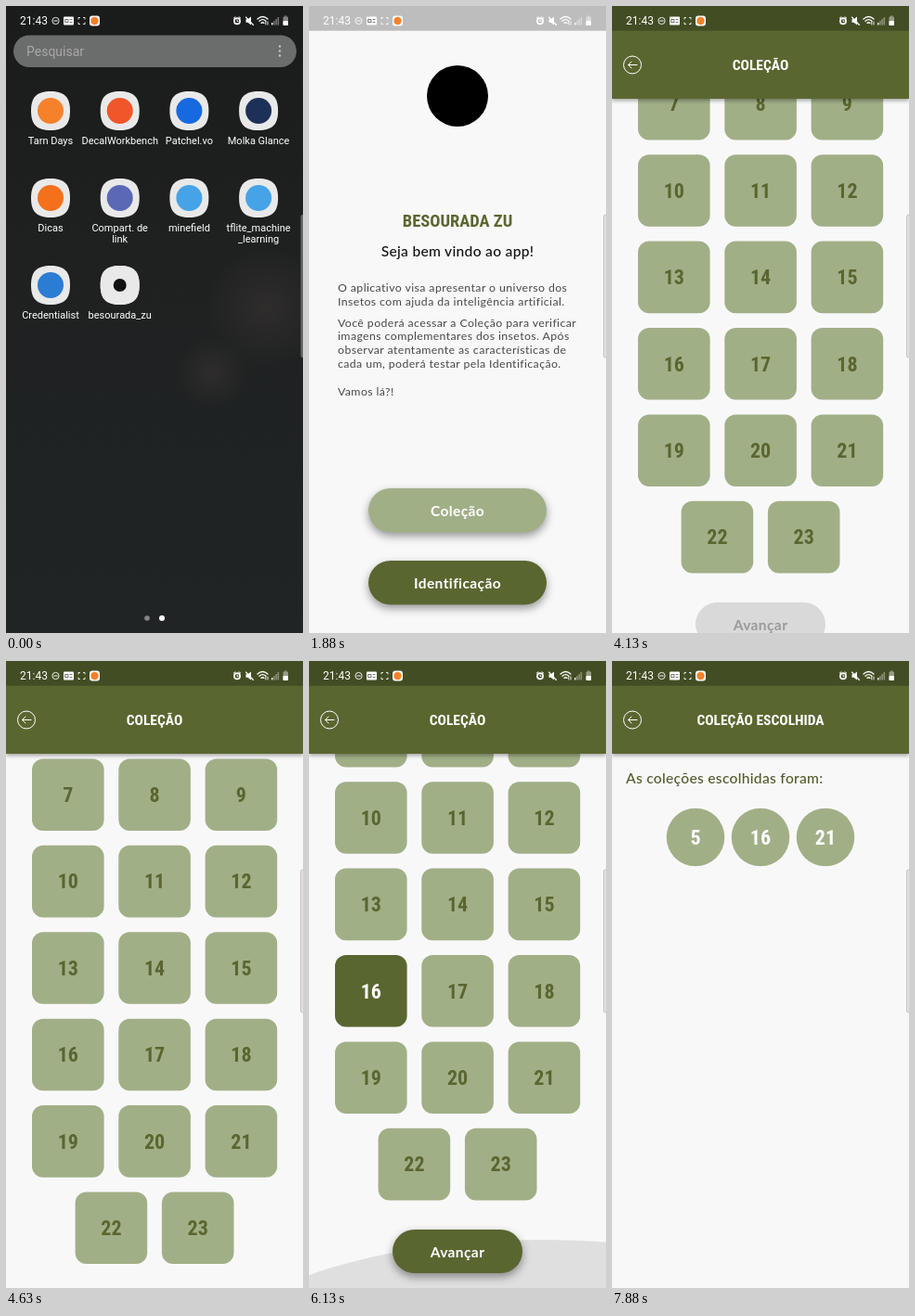
These frames come from a looping animation (320 by 676 pixels, 8000 ms). An HTML page:

```html
<!DOCTYPE html>
<html lang="pt">
<head>
<meta charset="utf-8">
<title>Coleção de insetos</title>
<style>
  html, body { margin: 0; width: 100%; height: 100%; overflow: hidden; background: #000; }
  svg { display: block; width: 100%; height: 100%; }
  text { font-family: Roboto, sans-serif; }
  .mid { text-anchor: middle; }
  .label { font-size: 11px; fill: #fff; text-anchor: middle; }
  .body, .lead, .button { font-family: Lato, sans-serif; }
  .body { font-size: 12.3px; letter-spacing: .41px; fill: #484848; }
  .lead { font-size: 15.6px; letter-spacing: .3px; font-weight: 500; }
  .button { font-size: 15.5px; letter-spacing: .4px; font-weight: 700; text-anchor: middle; }
  .narrow { font-family: "Roboto Condensed", Roboto, sans-serif;
            font-stretch: condensed; font-weight: 700; text-anchor: middle; }
  .raised { filter: drop-shadow(0 4px 5px rgba(0,0,0,.4)); }
  .bar { filter: drop-shadow(0 2px 2px rgba(0,0,0,.35)); }
</style>
</head>
<body>
<svg id="stage" viewBox="0 0 320 676">
  <defs>
    <linearGradient id="wall" x2="0" y2="1">
      <stop offset="0" stop-color="#1a1b1b"/>
      <stop offset=".4" stop-color="#1f2121"/>
      <stop offset="1" stop-color="#202425"/>
    </linearGradient>
    <radialGradient id="haze">
      <stop offset="0" stop-color="#3a3433" stop-opacity=".6"/>
      <stop offset="1" stop-color="#3a3433" stop-opacity="0"/>
    </radialGradient>
  </defs>
</svg>
<script>
const DURATION = 8000, STEP = 125;
const DARK = '#5a6630', LIGHT = '#a1af87', PAPER = '#f9f8f9';
const SCROLL = [[3625, 0], [3875, 100], [4125, 236], [4250, 266], [4500, 266], [4875, 60], [5000, 0], [5500, 0], [6000, 266]];
const PICKED = { 5: 5125, 16: 5500, 21: 6500 };

const stage = document.getElementById('stage');

function set(node, attrs) {
  for (const key in attrs) node.setAttribute(key, attrs[key]);
  return node;
}
function add(parent, tag, attrs = {}, content = '') {
  const node = set(document.createElementNS('http://www.w3.org/2000/svg', tag), attrs);
  node.textContent = content;
  return parent.appendChild(node);
}
const group = (parent, attrs) => add(parent, 'g', attrs);
const rect = (parent, x, y, width, height, fill, rx = 0, more = {}) =>
  add(parent, 'rect', { x, y, width, height, fill, rx, ...more });
const circle = (parent, cx, cy, r, fill, more = {}) => add(parent, 'circle', { cx, cy, r, fill, ...more });
const line = (parent, d, stroke = '#fff', width = 1) =>
  add(parent, 'path', { d, stroke, 'stroke-width': width, fill: 'none', 'stroke-linecap': 'round' });
const label = (parent, x, y, content, cls, more = {}) => add(parent, 'text', { x, y, class: cls, ...more }, content);

const clamp = v => Math.max(0, Math.min(1, v));
const mix = (a, b, p) => a + (b - a) * p;
const progress = (t, start, length) => 1 - (1 - clamp((t - start) / length)) ** 3;
function along(points, t) {
  const i = points.findIndex(p => p[0] > t);
  if (i === 0) return points[0][1];
  if (i < 0) return points[points.length - 1][1];
  const [a, b] = [points[i - 1], points[i]];
  return mix(a[1], b[1], (t - a[0]) / (b[0] - a[0]));
}

// Rounded launcher tile, centred on 0,0 and 42 wide
function appIcon(parent, color, r) {
  const g = group(parent);
  add(g, 'path', { d: 'M0-21C14.8-21 21-14.8 21 0S14.8 21 0 21-21 14.8-21 0-14.8-21 0-21Z', fill: '#e9e9e9' });
  circle(g, 0, 0, r, color);
  return g;
}

function buildLauncher() {
  const g = group(stage);
  rect(g, 0, 0, 320, 676, 'url(#wall)');
  circle(g, 280, 325, 65, 'url(#haze)');
  circle(g, 222, 395, 38, 'url(#haze)');
  rect(g, 8, 31.5, 305, 34.5, '#6b6c6c', 17.25);
  label(g, 22, 53.5, 'Pesquisar', '', { 'font-size': 14, fill: '#a8a8a8' });
  [43.5, 48.5, 53.5].forEach(y => circle(g, 295, y, 1.2, '#c4c4c4'));
  const apps = [
    ['Tarn Days', '#f5822b'], ['DecalWorkbench', '#f0562a'], ['Patchel.vo', '#1769e0'], ['Molka Glance', '#1d3158'],
    ['Dicas', '#f5701c'], ['Compart. de|link', '#5b68b5'], ['minefield', '#47a3e8'], ['tflite_machine|_learning', '#47a3e8'],
    ['Credentialist', '#2b7cd3'], ['besourada_zu', '#111']
  ];
  apps.forEach(([name, color], i) => {
    const x = 48 + 74.7 * (i % 4), y = 113 + 94 * Math.floor(i / 4);
    set(appIcon(g, color, i === 9 ? 7 : 14), { transform: `translate(${x} ${y})` });
    name.split('|').forEach((part, row) => label(g, x, y + 36 + row * 12, part, 'label'));
  });
  circle(g, 152, 660, 2.8, '#858585');
  circle(g, 168, 660, 3, '#fff');
  return g;
}

function buildWelcome() {
  const g = group(stage);
  rect(g, 0, 0, 320, 676, PAPER);
  rect(g, 0, 0, 320, 26.7, '#bdbdbd');
  circle(g, 160, 97, 33, '#000');
  label(g, 160, 238, 'BESOURADA ZU', 'narrow', { 'font-size': 18.5, fill: DARK });
  label(g, 160, 269.5, 'Seja bem vindo ao app!', 'lead mid', { fill: '#111' });
  [[308, 'O aplicativo visa apresentar o universo dos'],
   [323, 'Insetos com ajuda da inteligência artificial.'],
   [345.5, 'Você poderá acessar a Coleção para verificar'],
   [360, 'imagens complementares dos insetos. Após'],
   [375, 'observar atentamente as características de'],
   [390, 'cada um, poderá testar pela Identificação.'],
   [420, 'Vamos lá?!']].forEach(([y, words]) => label(g, 31, y, words, 'body'));
  [[520, LIGHT, 'Coleção'], [598, DARK, 'Identificação']].forEach(([y, color, name]) => {
    rect(g, 64, y, 192, 47.5, color, 23.75, { class: 'raised' });
    label(g, 160, y + 30, name, 'button', { fill: '#fff' });
  });
  return g;
}

function addAppBar(page, title) {
  rect(page, 0, 0, 320, 100, DARK, 0, { class: 'bar' });
  rect(page, 0, 0, 320, 26.7, '#424d24');
  circle(page, 22, 63.5, 9.5, 'none', { stroke: '#fff' });
  line(page, 'M27 63.5H17.5M21 60L17.5 63.5L21 67');
  label(page, 160, 69, title, 'narrow', { 'font-size': 15.5, fill: '#fff' });
}

function buildCollection() {
  const page = group(stage);
  rect(page, 0, 0, 320, 676, PAPER);
  const glow = add(page, 'ellipse', { cx: 250, cy: 760, rx: 360, ry: 136, fill: '#000' });
  const list = group(page);
  const tiles = Array.from({ length: 23 }, (_, i) => {
    const row = Math.floor(i / 3);
    const x = (row === 7 ? 74.6 : 28) + 93.3 * (i % 3), y = 116 + 93.4 * row;
    return {
      box: rect(list, x, y, 77.6, 77.6, LIGHT, 12),
      digits: label(list, x + 38.8, y + 46.5, i + 1, 'narrow', { 'font-size': 22 })
    };
  });
  const next = {
    box: rect(list, 90, 879, 140, 47, '#d9d9d9', 23.5),
    name: label(list, 160, 908.5, 'Avançar', 'button')
  };
  addAppBar(page, 'COLEÇÃO');
  return { page, glow, list, tiles, next };
}

function buildChosen() {
  const page = group(stage);
  rect(page, 0, 0, 320, 676, PAPER);
  addAppBar(page, 'COLEÇÃO ESCOLHIDA');
  label(page, 15, 132, 'As coleções escolhidas foram:', 'lead', { fill: '#505b29' });
  Object.keys(PICKED).forEach((n, i) => {
    circle(page, 90 + 70 * i, 190, 31.3, LIGHT);
    label(page, 90 + 70 * i, 197.5, n, 'narrow', { 'font-size': 22, fill: '#fff' });
  });
  return page;
}

function buildStatus() {
  const g = group(stage);
  label(g, 15, 20, '21:43', '', { 'font-size': 12, fill: '#fff' });
  circle(g, 53.5, 16, 3.6, 'none', { stroke: '#fff', 'stroke-width': .9 });
  line(g, 'M51.8 16H55.2');
  rect(g, 62, 11.5, 11, 9, '#fff', 1);
  line(g, 'M64 14.5H67V17.5H64ZM69 14.5H71M69 17.5H71', '#555', .8);
  line(g, 'M78 14V12.5H79.5M83.5 12.5H85V14M85 18V19.5H83.5M79.5 19.5H78V18', '#fff', .9);
  rect(g, 90, 10.5, 11, 11, '#fff', 3);
  circle(g, 95.5, 16, 4.2, '#f5822b');
  circle(g, 249, 16.3, 3.1, 'none', { stroke: '#fff', 'stroke-width': 1.7 });
  line(g, 'M245.3 13L247 11.8M252.7 13L251 11.8M249 15V16.5H250');
  add(g, 'path', { d: 'M258.5 14.2H260.5L264 11.5V20.5L260.5 17.8H258.5Z', fill: '#fff' });
  line(g, 'M258.5 12L266.5 20.5', '#fff', 1.1);
  line(g, 'M271 14Q276.5 9 282 14M273 16.3Q276.5 13 280 16.3M275 18.4Q276.5 17 278 18.4', '#fff', 1.3);
  line(g, 'M279.8 20V17M282 17V20', '#fff', .9);
  [0, 1, 2, 3].forEach(i => rect(g, 286 + 2.2 * i, 18 - 2 * i, 1.5, 2.5 + 2 * i, '#fff', 0, { opacity: i ? .4 : .9 }));
  rect(g, 298.5, 11.5, 5.5, 9.5, '#fff', 1, { opacity: .45 });
  rect(g, 300, 10.5, 2.5, 1, '#fff', 0, { opacity: .45 });
  rect(g, 298.5, 16, 5.5, 5, '#fff', 1);
}

const launcher = buildLauncher();
const splash = rect(stage, 0, 0, 320, 676, '#000');
const splashIcon = appIcon(stage, '#111', 7);
const welcome = buildWelcome();
const collection = buildCollection();
const chosen = buildChosen();
const handle = rect(stage, 317.5, 225, 8, 154, '#666', 2);
buildStatus();

function slideIn(page, p) {
  set(page, { opacity: p, transform: `translate(0 ${60 * (1 - p)})`, visibility: p > 0 ? 'visible' : 'hidden' });
}

function renderLaunch(t) {
  const p = progress(t, 60, 540);
  set(launcher, { opacity: 1 - p });
  set(splash, {
    x: mix(102, 0, p), y: mix(280, 0, p), width: mix(42, 320, p), height: mix(42, 676, p),
    rx: mix(18, 0, p), opacity: clamp(p * 4)
  });
  set(splashIcon, { transform: `translate(${mix(122.7, 160.5, p)} ${mix(301, 337, p)}) scale(${mix(1, 1.55, p)})` });
  set(welcome, { opacity: clamp((t - 1250) / 250) });
}

function renderCollection(t) {
  const { page, glow, list, tiles, next } = collection;
  slideIn(page, progress(t, 3200, 300));
  set(list, { transform: `translate(0 ${-along(SCROLL, t)})` });
  tiles.forEach(({ box, digits }, i) => {
    const on = t >= PICKED[i + 1];
    set(box, { fill: on ? DARK : LIGHT });
    set(digits, { fill: on ? '#fff' : DARK });
  });
  const enabled = t >= PICKED[5];
  set(next.box, { fill: enabled ? DARK : '#d9d9d9', class: enabled ? 'raised' : '' });
  set(next.name, { fill: enabled ? '#fff' : '#999' });
  const strength = along([[5900, 0], [6125, 1], [6500, 0]], t);
  set(glow, { ry: 84 + 52 * strength, opacity: .1 * strength });
}

function render(t) {
  renderLaunch(t);
  renderCollection(t);
  slideIn(chosen, progress(t, 7200, 300));
  set(handle, t < 1375
    ? { fill: '#666', stroke: 'none' }
    : { fill: '#e2e0e2', stroke: '#bfb3bd', 'stroke-width': .8 });
}

const began = performance.now();
function tick() {
  const t = (performance.now() - began) % DURATION;
  render(Math.floor((t + 5) / STEP) * STEP % DURATION);
  requestAnimationFrame(tick);
}
tick();
</script>
</body>
</html>
```
